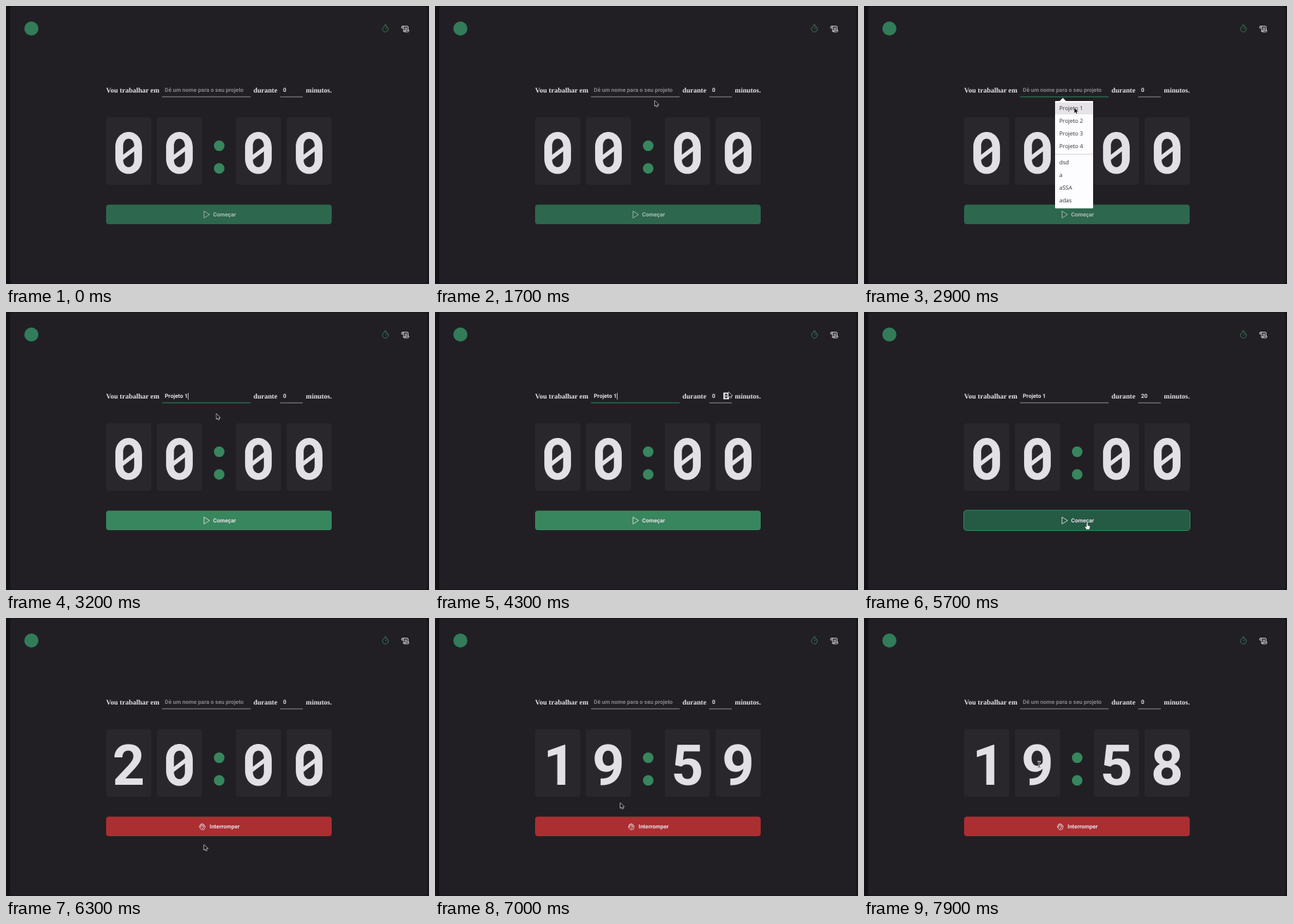
Animation of 600x395 px, one loop 8 s. Source, as an HTML page with a canvas:

```html
<!DOCTYPE html>
<html lang="pt">
<head>
<meta charset="utf-8">
<title>Timer</title>
<style>
  html, body { margin: 0; width: 100%; height: 100%; overflow: hidden; background: #141217; }
  canvas { display: block; width: 600px; height: 395px; }
</style>
</head>
<body>
<canvas id="stage"></canvas>
<script>
const W = 600, H = 395, LOOP = 8000;
const canvas = document.getElementById('stage');
const ctx = canvas.getContext('2d');
const dpr = window.devicePixelRatio || 1;
canvas.width = W * dpr;
canvas.height = H * dpr;
ctx.textRendering = 'geometricPrecision';

const COLOR = {
  edge: '#141217', panel: '#211f24', card: '#29272c', light: '#e2dfe5',
  muted: '#85838a', line: '#929097', green: '#38865e', focus: '#2f8a62',
  disabled: '#2d674e', hover: '#255a45', red: '#ab2e31', redHover: '#7a1f27'
};
const SANS = 'bold 8px Roboto, sans-serif';
const SERIF = 'bold 10px "Liberation Serif", serif';
const MENU = '8px "Open Sans", "Noto Sans", sans-serif';
const CARDS = [142, 214, 326, 398];
const BUTTON = [142, 282.2, 320, 27.8];
const OPTIONS = ['Projeto 1', 'Projeto 2', 'Projeto 3', 'Projeto 4', 'dsd', 'a', 'aSSA', 'adas'];

// Moments of the interaction, in ms
const OPEN = 2300, HIGHLIGHT = 2780, PICK = 3200, SPIN = 4400, PRESS = 5650, START = 5800;

// Pointer path: time, x, y
const PATH = [
  [100, 330, 349], [800, 338, 288], [1000, 336, 280], [1700, 311, 134], [1800, 306, 128],
  [2100, 290, 121], [2400, 288, 121], [2750, 297.5, 144], [3200, 297.5, 144], [3900, 385, 150],
  [4250, 415.5, 113], [5100, 415.5, 113], [5600, 316, 299.5], [6120, 316, 299.5],
  [6300, 280, 321.5], [6500, 272, 312], [7000, 262, 262], [7900, 248.5, 208]
];

function pointerAt(t) {
  if (t < PATH[0][0]) return null;
  const i = PATH.findIndex(p => p[0] > t);
  if (i < 0) {
    const [, x, y] = PATH[PATH.length - 1];
    return { x, y };
  }
  const [t0, x0, y0] = PATH[i - 1], [t1, x1, y1] = PATH[i];
  const u = (t - t0) / (t1 - t0), e = u * u * (3 - 2 * u);
  return { x: x0 + (x1 - x0) * e, y: y0 + (y1 - y0) * e };
}

const inside = (p, x, y, w, h) => !!p && p.x >= x && p.x <= x + w && p.y >= y && p.y <= y + h;

function box(x, y, w, h, r, color) {
  ctx.fillStyle = color;
  ctx.beginPath();
  ctx.roundRect(x, y, w, h, r);
  ctx.fill();
}

function disc(x, y, r, color) {
  ctx.fillStyle = color;
  ctx.beginPath();
  ctx.arc(x, y, r, 0, Math.PI * 2);
  ctx.fill();
}

function text(str, x, y, font, color) {
  ctx.font = font;
  ctx.fillStyle = color;
  ctx.fillText(str, x, y);
}

// SVG path placed at x, y
function shape(d, x, y, { fill, stroke, width = 1, scale = 1, rule = 'nonzero' }) {
  const path = new Path2D(d);
  ctx.save();
  ctx.translate(x, y);
  ctx.scale(scale, scale);
  ctx.lineJoin = ctx.lineCap = 'round';
  ctx.lineWidth = width;
  if (stroke) { ctx.strokeStyle = stroke; ctx.stroke(path); }
  if (fill) { ctx.fillStyle = fill; ctx.fill(path, rule); }
  ctx.restore();
}

// Upright oval around the origin with straight sides of half length `side`
function oval(w, h, side) {
  const a = side + (h - side) * 0.61, b = w * 0.55;
  return `M${-w} ${-side}C${-w} ${-a} ${-b} ${-h} 0 ${-h}C${b} ${-h} ${w} ${-a} ${w} ${-side}` +
    `V${side}C${w} ${a} ${b} ${h} 0 ${h}C${-b} ${h} ${-w} ${a} ${-w} ${side}Z`;
}
const ZERO = oval(18.9, 29.8, 8) + oval(7.8, 20.2, 10);
const SLASH = 'M-9 3.4L9 -10.4V-3L-9 10.8Z';

function digit(char, cx) {
  if (char === '0') {
    shape(ZERO, cx, 208.8, { fill: COLOR.light, rule: 'evenodd' });
    shape(SLASH, cx, 208.8, { fill: COLOR.light });
    return;
  }
  ctx.textAlign = 'center';
  text(char, cx + (char === '1' ? 2.5 : 0), 237.2, 'bold 80px Roboto, sans-serif', COLOR.light);
  ctx.textAlign = 'left';
}

function drawHeader() {
  disc(36, 32, 10, '#327c5a');

  shape('M4.4 0A4.4 4.4 0 1 1 -4.4 0A4.4 4.4 0 1 1 4.4 0M0 0L2.2 -2.2M-1.6 -6.2H1.6', 538.2, 32.8,
    { stroke: COLOR.green, width: 0.9, scale: 0.95 });
  shape('M2 8.5V2.2A1.5 1.5 0 0 0 -1 2.2V3.5H1.5M.5 .7H7.5Q9 .7 9 2.2V7' +
    'M4.2 7H10.2V8.2Q10 9.5 8.8 9.5H3.4Q2 9.5 2 8M4.2 7Q5 9.2 3.6 9.5M4.3 3.4H7M4.3 5.2H7',
    562.1, 28, { stroke: COLOR.light, scale: 0.92 });
}

function drawForm(t) {
  const filled = t >= PICK && t < START;
  const taskFocus = t >= OPEN - 100 && t < SPIN;
  const minutesFocus = t >= SPIN && t < PRESS;
  const minutes = t < SPIN || t >= START ? 0 : Math.min(20, 5 * (1 + Math.floor((t - SPIN) / 190)));

  text('Vou trabalhar em', 142, 123.2, SERIF, COLOR.light);
  text('durante', 351, 123.2, SERIF, COLOR.light);
  text('minutos.', 425.3, 123.2, SERIF, COLOR.light);

  text(filled ? 'Projeto 1' : 'Dê um nome para o seu projeto', 225.2, 122.4, SANS,
    filled ? COLOR.light : COLOR.muted);
  text(String(minutes), 393, 122.4, SANS, COLOR.light);

  box(221.3, 128.6, 125.7, 1, 0, taskFocus ? COLOR.focus : COLOR.line);
  box(389, 128.6, 32, 1, 0, minutesFocus ? COLOR.focus : COLOR.line);

  const blinkStart = filled ? PICK : OPEN;
  if (taskFocus && t >= OPEN && Math.floor((t - blinkStart) / 500) % 2 === 0) {
    box(filled ? 258 : 225, 115, 0.8, 9.5, 0, COLOR.light);
  }
}

function drawSpinner() {
  box(409, 114.5, 8, 9.5, 0, '#e8e6ea');
  shape('M2 3.6L4 1.4L6 3.6ZM2 6L4 8.2L6 6Z', 409, 114.5, { fill: '#222', stroke: '#222', width: 0.6 });
}

function drawClock(t) {
  const seconds = t < START ? 0 : 1200 - Math.floor((t - START) / 1000);
  const pad = n => String(n).padStart(2, '0');
  const chars = pad(Math.floor(seconds / 60)) + pad(seconds % 60);
  CARDS.forEach((x, i) => {
    box(x, 158, 64, 96, 4, COLOR.card);
    digit(chars[i], x + 32);
  });
  for (const y of [198.6, 230.8]) disc(302.4, y, 7.5, COLOR.green);
}

function drawButton(t, pointer) {
  const over = inside(pointer, ...BUTTON);
  if (t >= START) {
    box(...BUTTON, 4, over ? COLOR.redHover : COLOR.red);
    shape('M1.5 5V2.4Q2.3 1.1 3.2 2.4V4.6M3.2 2.4V1.2Q4.1 0 5 1.2V4.5M5 1.7Q6 .7 6.8 1.8V5.2' +
      'M6.8 3.6Q7.7 2.7 8.5 3.8V6.2Q8.3 9.6 4.9 9.6Q2.7 9.6 1.5 7.2L.4 5.2Q.5 4 1.6 4.8L2.6 6.4' +
      'M4.7 8Q4.8 6 6.8 5.4', 273.8, 291.4, { stroke: COLOR.light, width: 0.8 });
    text('Interromper', 288.8, 299.2, SANS, COLOR.light);
    return;
  }
  const enabled = t >= PICK;
  if (enabled && t >= PRESS) box(141, 281.2, 322, 29.8, 5, '#2e8a60');
  box(...BUTTON, 4, !enabled ? COLOR.disabled : over ? COLOR.hover : COLOR.green);
  const ink = enabled ? COLOR.light : '#adbab5';
  shape('M0 0L7.6 4.7L0 9.4Z', 281.2, 291.6, { stroke: ink, width: 0.9 });
  text('Começar', 293.8, 299.2, SANS, ink);
}

function drawMenu(t) {
  box(271, 135, 54, 152.5, 1, '#fdfcfe');
  shape('M0 5L5 0L10 5Z', 277, 130.5, { fill: '#fdfcfe' });
  if (t >= HIGHLIGHT) box(271, 137, 54, 17, 0, '#e6e3e8');
  box(271, 210, 54, 1, 0, '#d9d7db');
  OPTIONS.forEach((name, i) => text(name, 277, 148.3 + i * 18 + (i > 3 ? 5 : 0), MENU, '#333136'));
}

function drawPointer(t, p) {
  const menuOpen = t >= OPEN && t < PICK;
  const overButton = t >= PICK && inside(p, ...BUTTON);
  const overField = inside(p, 221, 112, 126, 17) || inside(p, 389, 114, 19, 15);
  const overDigit = CARDS.some(x => inside(p, x + 8, 174, 48, 64));
  if (overButton) {
    shape('M-1 0Q0 -1 1 0V3.6L4 4.2Q4.8 4.6 4.6 6L3.8 9.6H-1.2L-3.6 6Q-3.6 4.8 -2.4 5.2L-1 6.4Z',
      p.x + 0.5, p.y + 1, { stroke: '#1b1a1d', fill: '#f7f6f8', scale: 0.85 });
  } else if (!menuOpen && (overField || overDigit)) {
    const beam = 'M-1.6 -4H-.6L0 -3.5L.6 -4H1.6M0 -3.5V3.5M-1.6 4H-.6L0 3.5L.6 4H1.6';
    shape(beam, p.x, p.y, { stroke: '#f2f0f4', width: 1.8 });
    shape(beam, p.x, p.y, { stroke: '#2a292c', width: 0.8 });
  } else {
    shape('M0 0V8.4L2 6.6L3.4 9.6L4.8 9L3.5 6.1H6.2Z', p.x + 0.9, p.y + 0.8,
      { stroke: '#f2f0f4', width: 1.3, fill: '#19181b', scale: 0.86 });
  }
}

function draw(t) {
  const pointer = pointerAt(t);
  ctx.setTransform(dpr, 0, 0, dpr, 0, 0);
  ctx.fillStyle = COLOR.edge;
  ctx.fillRect(0, 0, W, H);
  box(6, 0.5, 592, 394, 4, COLOR.panel);
  drawHeader();
  drawForm(t);
  drawClock(t);
  drawButton(t, pointer);
  if (t >= OPEN && t < PICK) drawMenu(t);
  if (inside(pointer, 389, 110, 32, 20)) drawSpinner();
  if (pointer) drawPointer(t, pointer);
}

const begin = performance.now();
function tick() {
  draw((performance.now() - begin) % LOOP);
  requestAnimationFrame(tick);
}
tick();
</script>
</body>
</html>
```
